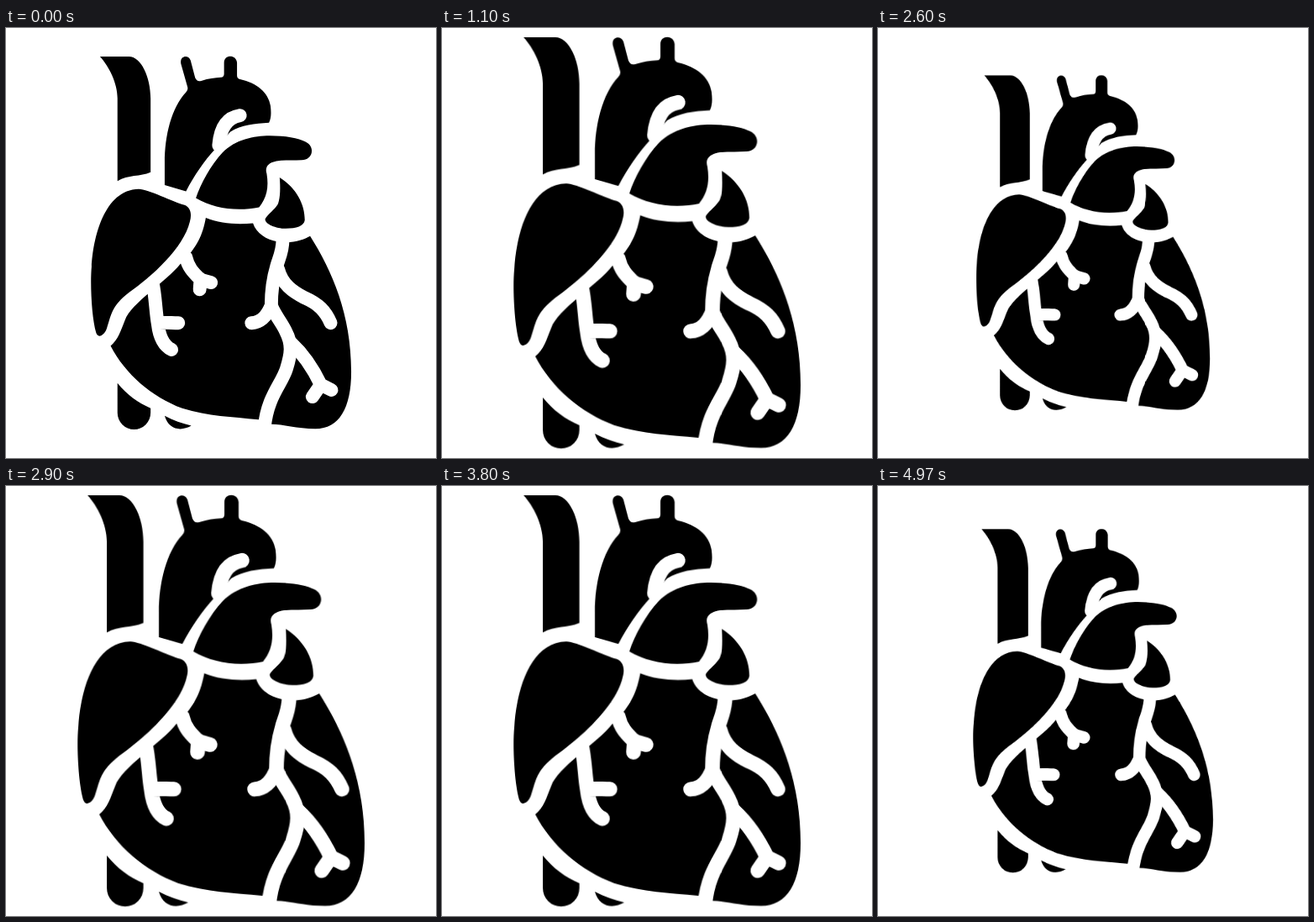
Recreate the animation shown at these times as an HTML page. Size 512 px wide and 512 px high, loop 5.01 s.

```html
<!DOCTYPE html>
<html lang="en">
<head>
<meta charset="utf-8">
<title>Beating heart</title>
<style>
  html, body { margin: 0; width: 100%; height: 100%; overflow: hidden; background: #fff; }
  svg { display: block; width: 100vw; height: 100vh; }
  #heart { transform-box: view-box; transform-origin: 256px 256px; }
  #veins { fill: none; stroke: #fff; stroke-width: 17.5; stroke-linecap: round; stroke-linejoin: round; }
</style>
</head>
<body>
<svg viewBox="0 0 512 512">
  <g id="heart">
    <!-- vena cava, above and below -->
    <path d="M97 11H135C151 11 163.500 38 163.500 66V163C150 169 134 166 120 174.500V66C120 46 109 24 97 11Z"/>
    <path d="M120 440C132 455 147 466 163.500 473V479A21.700 21.700 0 0 1 120 479Z"/>
    <path d="M182 483C193 489 205 493 217 496C203 504 187 501 182 483Z"/>
    <!-- aorta -->
    <path d="M182 180V150C182 115 191 78 210 58Q213 55 212 51L203.500 21C201 10 213 8 216 16L222 39C224 43 226 44 230 43C240 40 248 39 256 38.500Q260 38 260 34V19C260 8 276 8 277 19V36Q277 40 281 41C303 46 318 58 321 76C322 85 322 92 319 98C300 99 283 101 268 110L248 133C234 148 221 167 210 188Z"/>
    <!-- pulmonary artery -->
    <path d="M223 197C229 178 243 153 258 137C275 120 299 115 320 115C340 115 358 118 367 123C380 129 377 147 362 147C348 148 334 146 323 150C316 153 314 158 316 165C319 183 316 197 306 209C278 215 246 211 223 197Z"/>
    <!-- auricle and atrium -->
    <path d="M333 170C355 184 366 205 366 226C365 234 355 237 341 237C328 237 314 231 314 225C314 221 328 211 331 204C334 196 334 183 333 170Z"/>
    <path d="M148 185C160 185 193 202 208 206C216 209 218 218 215 228C207 262 165 300 135 321C112 339 112 350 106 368C103 377 95 382 92 374C86 354 84 310 86 287C88 250 102 186 148 185Z"/>
    <!-- ventricles -->
    <path d="M236 223C255 231 279 232 298 230C302 243 316 252 330 254C348 258 364 252 373 247C402 293 427 350 427 425C427 473 411 500 380 500C355 500 338 494 322 494L305 488C270 484 240 484 205 473C165 458 130 428 111 391C121 383 124 372 130 357C138 335 185 306 203 283C225 262 232 245 236 223Z"/>
    <g id="veins">
      <path d="M281 88.500C265 91 255 103 253 128"/>
      <path d="M337 252C337 268 331 278 329 287C326 297 322 312 322 338C326 350 335 359 341 372C350 389 348 402 342 421C336 441 317 457 313 498"/>
      <path d="M331 290C336 310 350 320 366 328C384 336 393 345 400 361"/>
      <path d="M322 338C317 350 310 360 296 361"/>
      <path d="M348 387C361 399 376 419 387 442L401 449M387 442L376 458"/>
      <path d="M210 275C213 289 221 296 229 304L243 308M229 303L228 317"/>
      <path d="M166 308C170 325 170 345 173 362C175 380 181 391 191 396M174 361C184 360 190 361 200 361"/>
    </g>
  </g>
</svg>
<script>
  const LOOP = 5010, FRAMES = 150, BEAT = 27;
  const PEAK = 4.5, RISE = 8.5;
  const LOW = 192, HIGH = 256, DRAWN = 245; // half heights in px

  // Steady swell to the peak, then a decelerating release.
  function halfHeight(frame) {
    const p = (frame - PEAK + RISE + BEAT) % BEAT;
    const level = p < RISE ? p / RISE : Math.pow(1 - (p - RISE) / (BEAT - RISE), 2.25);
    return LOW + (HIGH - LOW) * level;
  }

  // Each pose is held; starts fall on whole hundredths of a second.
  const pose = (frame, offset) => ({
    transform: `scale(${halfHeight(frame) / DRAWN})`,
    easing: "steps(1, end)",
    offset
  });

  const steps = Array.from({ length: FRAMES }, (_, i) =>
    pose(i, Math.round(i * 10 / 3) * 10 / LOOP));
  steps.push(pose(FRAMES - 1, 1));

  document.getElementById("heart").animate(steps, { duration: LOOP, iterations: Infinity });
</script>
</body>
</html>
```
